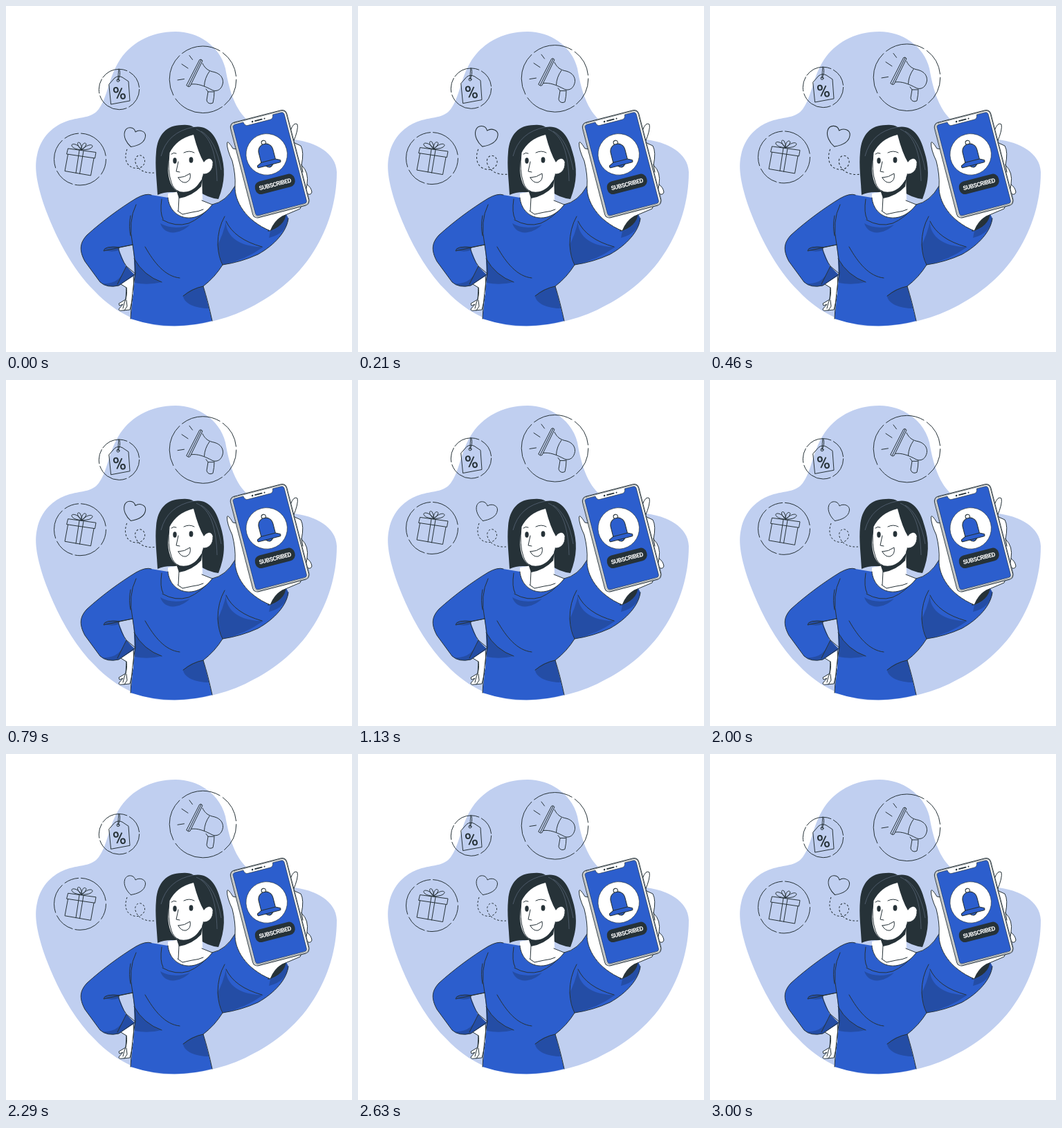
Recreate the animation shown at these times as an HTML page. Size 500x500 px, loop 3.04 s.

```html
<!DOCTYPE html>
<html lang="en">
<head>
<meta charset="utf-8">
<title>Subscribed</title>
<style>
  html, body { margin: 0; width: 100%; height: 100%; overflow: hidden; background: #fff; }
  svg { display: block; width: 100vw; height: 100vh; }
  .line { fill: none; stroke: #263238; stroke-linecap: round; stroke-linejoin: round; }
  .blue { fill: #2c5ecd; }
  .shade { fill: #244da5; }
  .dark { fill: #263238; }
  .white { fill: #fff; }
  .edge { stroke: #263238; stroke-linejoin: round; }
  .strand { fill: none; stroke: #75839a; stroke-width: .5; }
  text { font-family: Roboto, "Liberation Sans", sans-serif; text-anchor: middle; }
</style>
</head>
<body>
<svg viewBox="0 0 500 500">
  <path fill="#c0cff0" d="M245 37C278 37 309 58 317 90C321 112 327 141 344 160C358 178 385 189 417 193C447 197 477 212 478 240C478 283 465 322 445 354C420 395 382 422 346 439C310 456 270 463 238 463C200 463 160 446 128 412C95 380 70 330 55 288C46 260 40 236 45 215C50 190 68 172 92 165C112 160 125 161 134 149C147 131 148 106 162 82C178 54 209 37 245 37Z"/>

  <!-- floating icons, drawn at their lowest position -->
  <g id="floaters" class="line">
    <g>
      <circle cx="284.5" cy="106.3" r="48.3" stroke-dasharray="42 4 76 6 62 5 58 5 40 5.5"/>
      <path d="M280 77.500Q282 76 284 79L266 116Q264 118 261 115ZM282 78L263.500 115.500M284 83C288 91 293 94 301 95.500C310 98 314 104 313.500 111C312 120 306 124 299 122C286 115 277 112 268 113M294 94.500Q287 104 286.500 115.500M289 120L292 124L290 136Q291 141 296 141L299 140Q301 132 301 123M292 124L300 124M265 71.500L269.500 77.500M254 84L263 90M248 107L257.500 105.500"/>
    </g>
    <g>
      <circle cx="163.500" cy="120.500" r="29.200" stroke-dasharray="31 4 47 4 21 3 39 4 27 3.500"/>
      <path d="M149 113L157 104Q162 100 168 103L177 109L179 137L152 142ZM163 91Q162 98 162 107M164 92Q166 100 162 107"/>
      <circle cx="162" cy="107.500" r="2"/>
      <text class="dark" stroke="none" transform="translate(165 135) rotate(-7)" font-size="26" font-weight="500">%</text>
    </g>
    <g>
      <circle cx="107" cy="221.500" r="37.500" stroke-dasharray="23 5 38 4 30 5 43 5 21 4 52 5.600"/>
      <path d="M90 206L130 211.500L128.500 220L88 214ZM89.500 214.500L85 238.500L122.500 245L127 220M106 208.500L101 241.500M112 209.500L106.500 242.500M109 208C102 207 97 206 95 202C94 197 106 200 109 208C101 200 103 195 107 198Q110 202 109 208C109 198 115 196 116 200Q115 205 109 208C117 200 125 199 125 203Q123 208 109 208"/>
    </g>
  </g>

  <g id="heart" class="line">
    <path d="M180.500 203.500C174 198 169.500 189 171.500 182C174 173.500 185 174 187 182C193 178 202 181 201.500 188C200.500 198 190 202 180.500 203.500Z"/>
    <path stroke-dasharray="2.800 2.500" stroke-linecap="butt" d="M175 207C170 220 174 232 185 234C196 237 204 227 199 219C194 212 185 217 187 226C190 237 201 242 214 241"/>
  </g>

  <!-- hand on the hip -->
  <path class="white edge" d="M175 390L166 402L174 407L173 424L163 430L164 433L169 431L163 438Q163 441 168 440L179 439L185 414L184 387Z"/>
  <path class="line" d="M174 407Q176 418 171 429L169 437M174 425L175 434L171 440"/>

  <!-- sweater -->
  <path class="blue" d="M180 452L184 415L187 385L183 345L162 349L173 376L186 389L163 404Q146 408 136 399L114 369C105 352 107 342 117 331C139 311 165 292 188 278Q202 270 210 273L234 277C237 309 275 318 298 287Q318 283 331 260C330 282 346 310 382 325L404 300L408 307C406 325 389 345 364 359Q340 370 313 374Q301 393 285 405Q292 430 298 455Q238 471 180 452Z"/>
  <g class="shade">
    <path d="M223 314C234 321 252 322 266 316C252 330 229 333 223 314Z"/>
    <path d="M185 365Q199 390 225 399Q205 404 186 400Z"/>
    <path d="M285 405Q268 407 256 419C257 430 274 437 293 437Z"/>
    <path d="M318 311C317 335 342 349 372 348Q346 367 313 374Q308 363 306 345Q314 329 318 311Z"/>
    <path d="M174 376L186 389L163 404Q148 407 139 401Q165 403 174 376Z"/>
    <path d="M141 352Q151 346 164 348L163 353Q151 357 141 352Z"/>
    <path d="M382 325Q399 321 405 301L408 307Q405 329 380 335Z"/>
  </g>
  <path class="line" d="M183 345L162 349Q166 365 174 376M210 273Q202 270 188 278C165 292 139 311 117 331C107 342 105 352 114 369L136 399Q146 408 163 404L187 387L174 376L161 402M183 345L141 354Q142 346 164 349M188 287Q176 311 183 345Q187 365 187 386Q182 412 180 452M180 303Q177 319 180 332M225 279Q222 299 227 308M201 348C214 371 230 391 251 393M185 365Q199 390 225 399M298 455Q292 427 285 405Q270 408 256 419M285 405Q302 392 313 374Q340 370 364 359C389 345 406 325 408 307M313 374Q307 363 306 345Q306 321 316 304M318 311Q330 337 370 348M298 287Q281 307 264 314Q245 320 226 309M298 287Q318 283 331 260"/>

  <!-- neck and head -->
  <path class="dark" d="M219 273C218 251 215 232 217 211C219 186 232 172 254 172Q265 171 271 175C292 171 304 187 310 211C317 233 317 254 307 279Q291 277 279 268L250 270Q232 267 219 273Z"/>
  <path class="white" d="M250 268L234 271V277C237 309 275 318 298 287L284 281L283 242Z"/>
  <path class="line" d="M234 277C237 309 275 318 298 287L283 281M248 296L255 301L269 298Q279 297 285 294M250 277L249 296"/>
  <path class="dark" d="M246 266Q268 273 284 249L282 261Q269 275 250 278Z"/>
  <path class="white" d="M271 186Q246 192 236 213L234 235Q235 260 247 267C264 273 279 263 285 243C293 244 300 236 299 227C297 217 289 221 286 226Q278 213 271 186Z"/>
  <path class="line" d="M236 213Q233 238 239 255Q242 265 250 268M285 243C293 244 300 236 299 227M239 214Q242 211 246 213M257 212Q265 208 272 212M249 225L246 239L251 240M249 248Q258 248 266 242Q268 252 260 255Q253 256 249 248Z"/>
  <g class="dark"><ellipse cx="244" cy="223.500" rx="2.700" ry="4.200"/><ellipse cx="267.500" cy="222.500" rx="2.900" ry="4.200"/></g>
  <path class="strand" d="M271 175Q233 182 224 217M275 178C296 187 304 214 305 253M282 181Q303 193 311 237"/>

  <!-- raised hand -->
  <path class="dark" d="M378 326L392 304L405 299C404 312 394 322 378 326Z"/>
  <path class="white edge" d="M328 206Q320 193 319.500 198Q319 207 327 224Q332 244 331 260C330 282 346 310 382 325Q388 310 399 304L425 293L434 270Q440 275 442 269Q441 262 435 258Q438 240 427 230Q431 211 426 202L415 197Q423 178 421 171Q416 167 411 180L390 215Z"/>
  <path class="line" d="M415 196L420 214M427 229L429 240M435 258L433 269"/>

  <!-- phone -->
  <g transform="translate(381.200 228.300) rotate(-14.500)">
    <rect class="white edge" x="-42" y="-71" width="84" height="142" rx="7"/>
    <rect class="line" stroke-width=".5" x="-40.300" y="-70" width="81.300" height="139.500" rx="6"/>
    <path class="blue edge" stroke-width=".6" d="M-34-68H-22Q-21-62-17-62H17Q21-62 22-68H34Q38.300-68 38.300-64V64Q38.300 68 34 68H-34Q-38.300 68-38.300 64V-64Q-38.300-68-34-68Z"/>
    <path class="line" stroke-width="1.800" d="M-5-65.500H5"/>
    <g class="dark"><circle cx="-9" cy="-65.500" r="1.300"/><circle cx="9" cy="-65.500" r="1"/></g>
    <circle class="white edge" stroke-width=".6" cx="-.9" cy="-14.600" r="29.800"/>
    <g class="blue edge" transform="translate(-.9 -14.600) scale(1.060)">
      <circle cy="-16.500" r="3" fill="none"/>
      <path d="M-5 15Q0 21 5 15Z"/>
      <path d="M-10 9V-4C-10-18 10-18 10-4V9L16 12Q17 15 14 15H-14Q-17 15-16 12Z"/>
      <path fill="none" d="M-10 9H10"/>
    </g>
    <rect class="dark" x="-29.500" y="20.500" width="59" height="19" rx="8.500"/>
    <text class="white" y="33.300" font-size="8.800" font-weight="700" letter-spacing="-.5">SUBSCRIBED</text>
  </g>
</svg>
<script>
  const LOOP = 3040, CYCLE = 3000;
  const floaters = document.getElementById('floaters');
  const heart = document.getElementById('heart');
  const beats = [[0, 1], [.1, 1.1], [.3, 1], [.4, 1], [.5, 1.1], [.6, 1], [1, 1]];

  function valueAt(keys, p) {
    const i = keys.findIndex(key => key[0] > p);
    const [p0, v0] = keys[i - 1], [p1, v1] = keys[i];
    return v0 + (v1 - v0) * (p - p0) / (p1 - p0);
  }

  function draw(ms) {
    const p = (ms % LOOP) / CYCLE % 1;
    const lift = 10 * (1 - Math.abs(1 - 2 * p));
    floaters.setAttribute('transform', `translate(0 ${-lift})`);
    heart.setAttribute('transform', `translate(192.5 209) scale(${valueAt(beats, p)}) translate(-192.5 -209)`);
  }

  const start = performance.now();
  function tick() {
    draw(performance.now() - start);
    requestAnimationFrame(tick);
  }
  tick();
</script>
</body>
</html>
```
